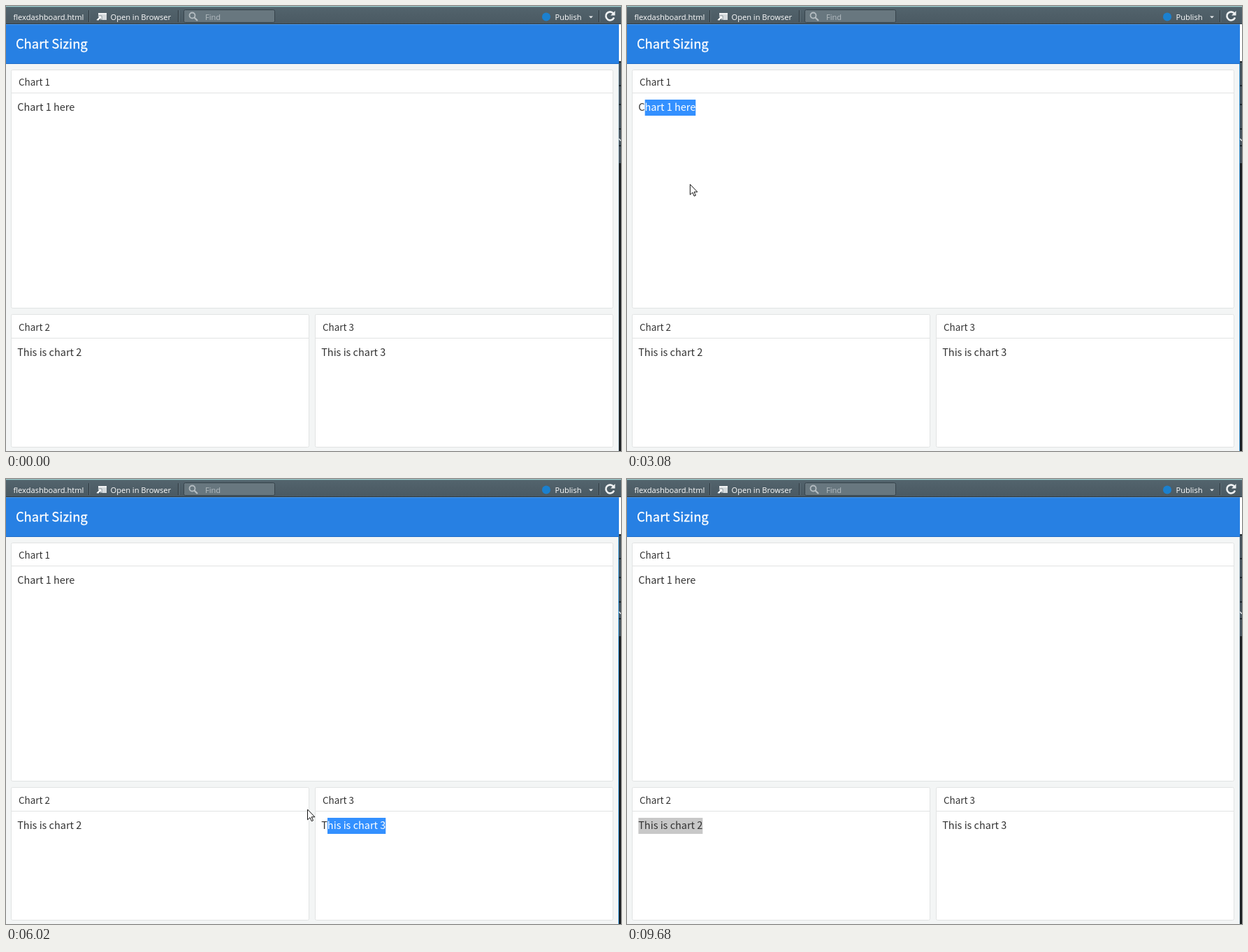
An HTML page that plays this animation: 880x637 px, repeating every 9.75 s.

```html
<!DOCTYPE html>
<html lang="en">
<head>
<meta charset="utf-8">
<title>Chart Sizing</title>
<style>
  html, body { margin: 0; height: 100%; overflow: hidden; background: #f3f5f5; }
  svg { display: block; }
  text { fill: #333; font-family: "Noto Sans CJK JP", "Noto Sans CJK SC", "Noto Sans CJK", sans-serif; }
  .brand { font-size: 18.4px; fill: #fff; stroke: #fff; stroke-width: .3; }
  .head { font-size: 13.45px; }
  .body { font-size: 14.48px; }
  .tool text { font: 11.1px "Open Sans", "Noto Sans", sans-serif; fill: #fff; }
  .tool .hint { fill: #b4bcc1; }
  .panel { fill: #fff; stroke: #e1e3e3; }
  .rule { stroke: #e1e3e3; }
  .mark rect { fill: #3390ff; }
  .mark text { fill: #fff; }
  .blur rect { fill: #c8c8c8; }
  .blur text { fill: #333; }
</style>
</head>
<body>
<svg width="880" height="637" viewBox="0 0 880 637">
  <defs>
    <linearGradient id="bar" x2="0" y2="1">
      <stop stop-color="#53646d"/><stop offset="1" stop-color="#4a5962"/>
    </linearGradient>
  </defs>
  <rect width="880" height="637" fill="#f3f5f5"/>

  <g class="tool">
    <rect width="880" height="26" fill="url(#bar)"/>
    <rect width="880" height="1" fill="#a5d3d3"/>
    <rect y="1" width="880" height="1" fill="#5f7b82"/>
    <rect y="25" width="880" height="1" fill="#2f3c45"/>
    <path d="M118.5 6V23M246.5 6V23M848.5 6V23" stroke="#2b363d"/>
    <path d="M119.5 6V23M247.5 6V23M849.5 6V23" stroke="#64747d"/>
    <text x="10.5" y="20">flexdashboard.html</text>
    <path d="M132 10h12v10h-9v-3h-3z" fill="#d5dadd"/>
    <path d="M132 10h12v2h-12z" fill="#f2f4f5"/>
    <path d="M129 20l4-4-2-2h6v6l-2-2-3 3z" fill="#fff" stroke="#53646d" stroke-width=".6"/>
    <text x="149.5" y="20">Open in Browser</text>
    <rect x="254.5" y="5.5" width="130" height="18" rx="2" fill="#68777f" stroke="#36434b"/>
    <circle cx="266.5" cy="13.5" r="4" fill="none" stroke="#b4bcc1" stroke-width="1.8"/>
    <path d="M269.5 16.5l4.5 4.5" stroke="#b4bcc1" stroke-width="2.2"/>
    <text class="hint" x="285" y="20">Find</text>
    <circle cx="773" cy="15.5" r="6" fill="#1b80cf"/>
    <text x="785.5" y="20">Publish</text>
    <path d="M834 14.5h6l-3 3z" fill="#e8ebed"/>
    <path d="M869 10.5a6 6 0 1 0 1 6" fill="none" stroke="#eef1f2" stroke-width="2.6"/>
    <path d="M871.5 7v6.5h-6.5z" fill="#eef1f2"/>
  </g>

  <rect y="26" width="877" height="56" fill="#2780e3"/>
  <rect y="26" width="877" height="1" fill="#4f9aea"/>
  <rect y="82" width="877" height="1" fill="#1c6cc9"/>
  <text class="brand" x="13.9" y="61">Chart Sizing</text>

  <rect x="877" y="27" width="3" height="52" fill="#fff"/>
  <rect x="877" y="79" width="3" height="146" fill="#46535c"/>
  <path d="M877 80h3M877 114h3M877 141h3M877 176h3M877 200h3" stroke="#1d262c" stroke-width="2"/>
  <path d="M877 190l3 3" stroke="#e4e8ea" stroke-width="1.5"/>
  <rect x="877" y="225" width="3" height="412" fill="#1b1e20"/>
  <rect id="border" x="876" y="83" width="1" height="554"/>

  <g id="panels"></g>
  <svg id="mark" class="mark" height="23" overflow="hidden">
    <rect width="200" height="23"/>
    <text class="body" y="16"></text>
  </svg>
  <g id="pointer">
    <circle id="halo" r="12.5" fill="#ff0" opacity=".53"/>
    <path id="arrow" d="M.5 0V14.8L4 11.6l2.3 5.2 2.2-1-2.3-5h4.7z" fill="#fff" stroke="#111"/>
    <path id="beam" d="M-1.5-6.5H.5L1.5-5.5 2.5-6.5H4.5M1.5-5.5V5.5M-1.5 6.5H.5L1.5 5.5 2.5 6.5H4.5" fill="none" stroke="#222"/>
  </g>
</svg>
<script>
const LOOP = 9750, TICK = 69, SELECT_LAG = 29, LINE_HEIGHT = 23;
const $ = id => document.getElementById(id);

const panels = [
  { x: 7, y: 91, w: 862, h: 342, title: "Chart 1", body: "Chart 1 here" },
  { x: 7, y: 441, w: 427, h: 191, title: "Chart 2", body: "This is chart 2" },
  { x: 442, y: 441, w: 427, h: 191, title: "Chart 3", body: "This is chart 3" }
];

$("panels").innerHTML = panels.map(p => {
  p.base = p.y + (p.y > 100 ? 1 : 0);
  p.lineTop = p.base + 43;
  return `<rect class="panel" x="${p.x + .5}" y="${p.y + .5}" width="${p.w - 1}" height="${p.h - 1}" rx="2"/>
    <path class="rule" d="M${p.x} ${p.base + 33.5}h${p.w}"/>
    <text class="head" x="${p.x + 11}" y="${p.base + 23}">${p.title}</text>
    <text class="body" x="${p.x + 9.2}" y="${p.base + 59}">${p.body}</text>`;
}).join("");

// Letter edges of each body line, used as caret stops.
document.querySelectorAll("#panels .body").forEach((el, i) => {
  const p = panels[i];
  p.stops = [...p.body].map((_, n) => el.getStartPositionOfChar(n).x);
  p.stops.push(p.stops[0] + el.getComputedTextLength());
});

// Pointer key points: [time, x, y]
const path = [
  [410, 801, 632], [1520, 24, 143], [2110, 24, 145], [2330, 123, 140],
  [2730, 123, 140], [3640, 20, 498], [3840, 20, 498], [3980, 118, 501.5], [4050, 154, 501],
  [4310, 154, 501], [4720, 460, 497], [5050, 460, 497], [5190, 523.5, 507], [5400, 580, 510],
  [5670, 580, 510], [6020, 431, 473], [6330, 398, 434], [6640, 425, 471],
  [7060, 406, 603.5], [7340, 425, 619], [8070, 425, 619], [8490, 820, 640]
];

const drags = [
  { from: 1790, to: 2730, panel: panels[0] },
  { from: 3840, to: 4310, panel: panels[1] },
  { from: 5050, to: 5670, panel: panels[2] },
  { from: 6640, to: 8070, panel: panels[1] }
];

const lastDrag = t => drags.findLast(d => d.from <= t);
const isPressed = t => t < (lastDrag(t)?.to ?? 0);
const segmentAt = t => path.findLastIndex(k => k[0] <= t);
const smooth = f => f * f * (3 - 2 * f);

// Free moves are eased; drags run evenly.
function pointerAt(t) {
  const i = segmentAt(t);
  const [t0, x0, y0] = path[i], [t1, x1, y1] = path[i + 1];
  const raw = (t - t0) / (t1 - t0);
  const f = isPressed(t) ? raw : smooth(raw);
  return [x0 + (x1 - x0) * f, y0 + (y1 - y0) * f];
}

function snapTime(t) {
  const t0 = path[segmentAt(t)][0];
  return t0 + Math.floor((t - t0) / TICK) * TICK;
}

function caretAt({ lineTop, stops }, [x, y]) {
  if (y < lineTop) return stops[0];
  if (y > lineTop + LINE_HEIGHT) return stops.at(-1);
  return stops.reduce((a, b) => Math.abs(b - x) < Math.abs(a - x) ? b : a);
}

const overText = (x, y) => panels.some(p =>
  (x > p.stops[0] && x < p.stops.at(-1) && y > p.lineTop && y < p.lineTop + 22) ||
  (x > p.x + 11 && x < p.x + 57 && y > p.y + 8 && y < p.y + 29));

const show = (el, on) => el.style.display = on ? "" : "none";

function drawPointer(t) {
  const present = t >= 410 && t < 8490;
  show($("pointer"), present);
  if (!present) return;
  const [x, y] = pointerAt(snapTime(t));
  const beam = overText(x, y);
  $("pointer").setAttribute("transform", `translate(${x} ${y})`);
  show($("beam"), beam);
  show($("arrow"), !beam);
  show($("halo"), isPressed(t));
}

function drawSelection(t) {
  const drag = lastDrag(t), mark = $("mark");
  show(mark, drag);
  if (!drag) return;
  const { from, to, panel } = drag;
  const now = Math.max(from, Math.min(to - 1, snapTime(Math.min(t, to - 1)) - SELECT_LAG));
  const left = caretAt(panel, pointerAt(from));
  const right = caretAt(panel, pointerAt(now));
  mark.setAttribute("x", left);
  mark.setAttribute("y", panel.lineTop);
  mark.setAttribute("width", Math.max(0, right - left));
  const label = mark.querySelector("text");
  label.textContent = panel.body;
  label.setAttribute("x", panel.stops[0] - left);
}

function render(t) {
  const focused = t >= 1790 && t < 9680;
  $("border").setAttribute("fill", focused ? "#4aa3e0" : "#b9cdd8");
  $("mark").classList.toggle("blur", !focused);
  drawPointer(t);
  drawSelection(t);
}

const start = performance.now();
function frame() {
  render((performance.now() - start) % LOOP);
  requestAnimationFrame(frame);
}
frame();
</script>
</body>
</html>
```
